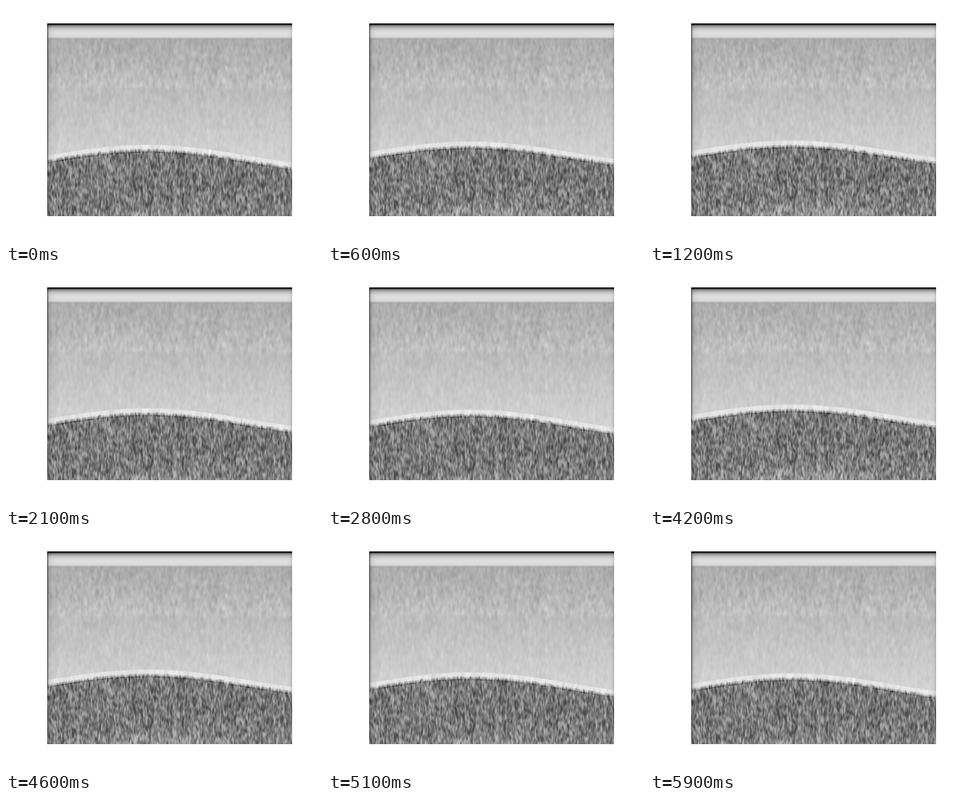
Animation, 560 px wide and 420 px high, one loop 6000 ms. Source, as a matplotlib script:

```python
import numpy as np
import matplotlib.pyplot as plt
from matplotlib.animation import FuncAnimation

W, H, DPI = 560, 420, 100
LEFT, TOP, RIGHT, BOTTOM = 73, 31, 507, 374
FRAMES, CYCLE = 60, 30
SKIN = 58            # depth that stays fixed while the rest stretches
PEAK = 239           # top of the bright interface when fully raised
TRAVEL = 9.6

rng = np.random.default_rng(7)
cols = RIGHT - LEFT
x = np.arange(LEFT, RIGHT)
y = np.arange(TOP, BOTTOM)
X, Y = np.meshgrid(x, y)


def smooth(noise, sigmas):
    """Periodic Gaussian blur, one sigma per axis, scaled to unit deviation."""
    spec = np.fft.fftn(noise)
    for axis, s in enumerate(sigmas):
        f = np.fft.fftfreq(noise.shape[axis])
        shape = [1] * noise.ndim
        shape[axis] = -1
        spec = spec * np.exp(-2 * (np.pi * s * f) ** 2).reshape(shape)
    out = np.fft.ifftn(spec).real
    return out / out.std()


def speckle(sx, sy):
    """Noise with vertical grain."""
    return smooth(rng.normal(size=(BOTTOM - TOP + 40, cols)), (sy, sx))


def column_noise(sigma):
    return smooth(rng.normal(size=cols), (sigma,))


fluid = speckle(1.4, 3.2)
tissue = np.clip(speckle(0.9, 2.6), -2.2, 2.2)
edge_a, edge_b, glow_a, glow_b = (column_noise(s) for s in (0.9, 0.9, 1.4, 1.4))
dots = np.clip(0.6 + 0.6 * column_noise(0.8), 0, 1)

tone = np.interp(
    y,
    [31, 32, 33, 35, 38, 41, 44, 48, 54, 56, 58, 61, 100, 143, 148, 250, 300],
    [5, 14, 65, 140, 182, 203, 217, 222, 218, 198, 167, 172, 180, 191, 187, 206, 212],
)[:, None]
grain = np.interp(y, [55, 62, 143, 148, 250], [0, 6, 6, 4, 3])[:, None]
from_left, from_right = X - LEFT, RIGHT - 1 - X
side = (1 - 0.55 * np.exp(-from_left / 1.1) - 0.13 * np.exp(-from_left / 5)
        - 0.14 * np.exp(-from_right / 2))
hill = PEAK + 18.7 * (1 - np.cos(0.0087 * (x - 250)))


def raised(k):
    return (1 - np.cos(2 * np.pi * (k - 11) / CYCLE)) / 2


def sample(field, rows):
    """Read the field at fractional rows."""
    i = np.floor(rows).astype(int)
    f = (rows - i)[:, None]
    return field[i] * (1 - f) + field[i + 1] * f


def draw(k):
    lift = min(raised(k % CYCLE), raised(25)) ** 1.2
    stretch = 1 + TRAVEL * lift / (PEAK - SKIN)
    depth = SKIN + (y - SKIN) / stretch
    rows = depth - TOP + 5

    above = tone + grain * sample(fluid, rows)
    glow = np.clip((depth - 340) / 30, 0, 1)[:, None] * np.exp(-((X - 275) / 170) ** 2)
    below = 121 + 22 * sample(tissue, rows) + 32 * glow

    # bright interface, its soft streaky lower edge and the broken dark line
    off = Y - (SKIN + (hill - SKIN) * stretch)
    a = np.pi * lift
    edge = 9.6 + 0.9 * (edge_a * np.cos(a) + edge_b * np.sin(a))
    white = 228 + 4 * (glow_a * np.cos(a) + glow_b * np.sin(a))
    fade = np.clip((off - edge + 3) / 6, 0, 1)
    lower = white * (1 - fade) + below * fade
    lower -= 60 * dots * np.exp(-((off - 13) / 0.8) ** 2)

    mix = np.clip(off + 0.8, 0, 1.6) / 1.6
    img = above * (1 - mix) + lower * mix
    shade = np.where(off < 11, side, 0.6 + 0.4 * side)
    return np.clip(img * shade, 0, 255)


fig = plt.figure(figsize=(W / DPI, H / DPI), dpi=DPI, facecolor="white")
ax = fig.add_axes([LEFT / W, 1 - BOTTOM / H, cols / W, (BOTTOM - TOP) / H])
ax.axis("off")
scan = ax.imshow(draw(0), cmap="gray", vmin=0, vmax=255,
                 interpolation="nearest", aspect="auto")


def update(k):
    scan.set_data(draw(k))
    return [scan]


anim = FuncAnimation(fig, update, frames=FRAMES, interval=100, repeat=True)
plt.show()
```
